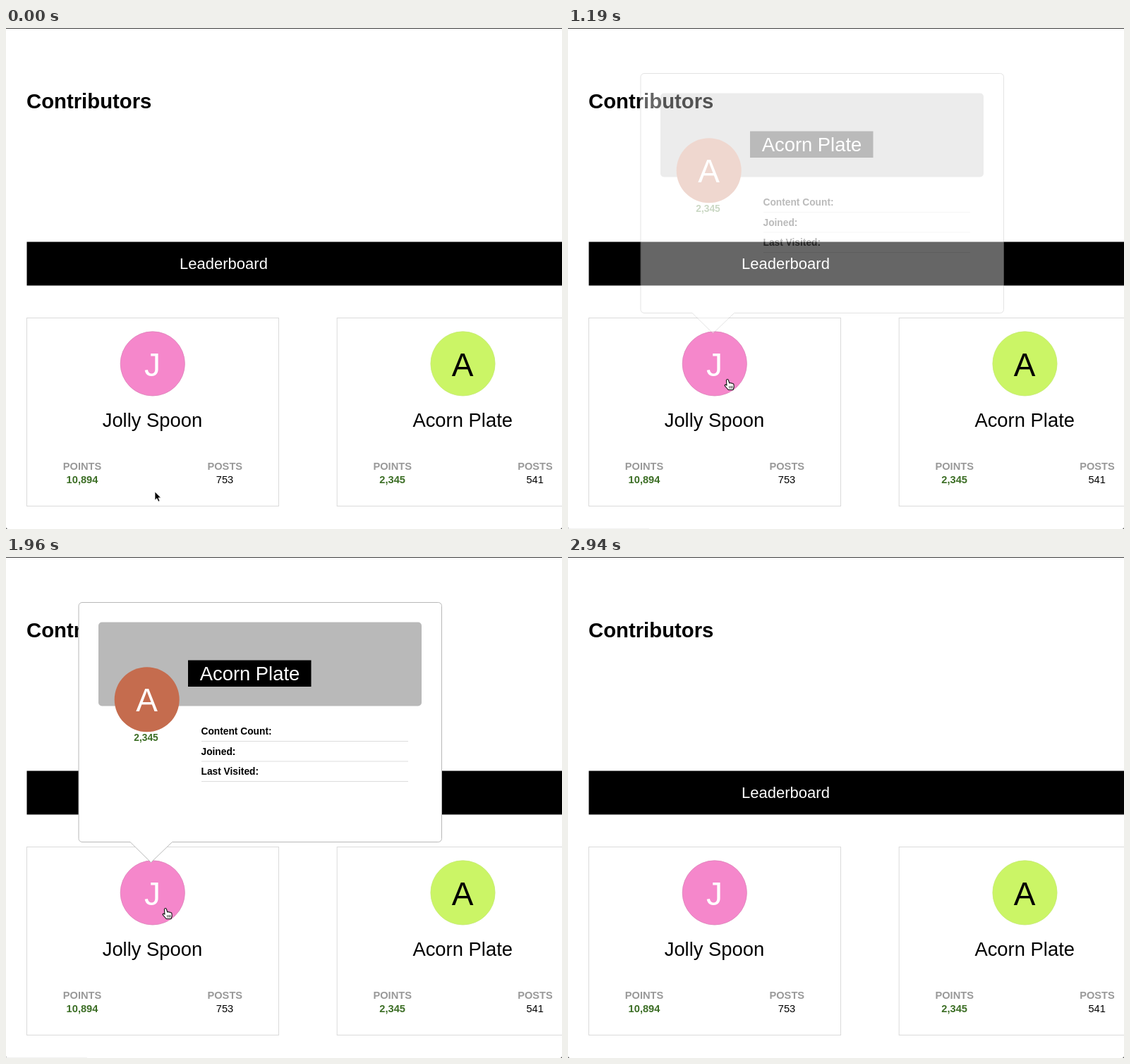
Write an HTML page that moves like this. It is 788 by 711 pixels and loops after 3010 ms.

```html
<!DOCTYPE html>
<html lang="en">
<head>
<meta charset="utf-8">
<title>Contributors</title>
<style>
html, body { margin: 0; width: 100%; height: 100%; overflow: hidden; background: #fff; }
svg { display: block; width: 788px; height: 711px; font-family: "Liberation Sans", Arial, sans-serif; }
.mid { text-anchor: middle; }
.bold { font-weight: 700; }
.name { font-size: 27.4px; }
.letter { font-size: 46px; }
.stat { font-size: 14.65px; }
.fact { font-size: 13.75px; }
.green { fill: #3c6e25; }
.grey { fill: #999; }

/* 43 ticks of 70 ms; steps(n) spans n ticks */
.cursor, .arrow, .hand, .popup, .inner, .status { animation: 3.01s step-end infinite; }
.cursor { animation-name: move; }
.arrow { animation-name: arrow; }
.hand { animation-name: hand; }
.popup { animation-name: fade; }
.inner { animation-name: settle; }
.status { animation-name: status; }

@keyframes move {
  0% { transform: translate(211px, 658px); animation-timing-function: steps(2); }
  4.651% { transform: translate(212px, 640px); animation-timing-function: steps(4); }
  13.953% { transform: translate(224px, 520px); animation-timing-function: steps(2); }
  18.605%, 69.767% { transform: translate(226px, 499px); }
  72.093% { transform: translate(228px, 510px); animation-timing-function: steps(3); }
  79.07% { transform: translate(240px, 572px); animation-timing-function: steps(4); }
  88.372%, 100% { transform: translate(250px, 725px); }
}
@keyframes arrow {
  0% { opacity: 1; }
  9.302% { opacity: 0; }
  81.395%, 100% { opacity: 1; }
}
@keyframes hand {
  0% { opacity: 0; }
  9.302% { opacity: 1; }
  81.395%, 100% { opacity: 0; }
}
@keyframes fade {
  0% { opacity: 0; }
  34.884% { opacity: 0; animation-timing-function: steps(5); }
  46.512% { opacity: 1; }
  69.767% { opacity: 1; animation-timing-function: steps(4); }
  79.07%, 100% { opacity: 0; }
}
@keyframes settle {
  0% { opacity: .45; }
  34.884% { opacity: .45; animation-timing-function: steps(5); }
  46.512% { opacity: 1; }
  69.767% { opacity: 1; animation-timing-function: steps(4); }
  79.07%, 100% { opacity: .55; }
}
@keyframes status {
  0% { opacity: 0; }
  37.209% { opacity: 1; }
  88.372%, 100% { opacity: 0; }
}
</style>
</head>
<body>
<svg viewBox="0 0 788 711">
  <rect width="788" height="711" fill="#fff"/>
  <rect width="788" height="1" fill="#3c3c3c"/>
  <path d="M0 709l2 2h-2zM788 709l-2 2h2z" fill="#555"/>
  <rect class="status" y="710" width="115" height="1" fill="#f2f2f2"/>

  <text class="bold" x="29" y="114" font-size="29.3">Contributors</text>
  <rect x="29.5" y="303.5" width="760" height="62"/>
  <text class="mid" x="308.5" y="342" font-size="22" fill="#fff">Leaderboard</text>

  <g id="cards"></g>

  <g class="popup">
    <path d="M108 64.5H612.5a5 5 0 0 1 5 5V399.5a5 5 0 0 1-5 5H235.500L205.500 433.500L176 404.500H108a5 5 0 0 1-5-5V69.500a5 5 0 0 1 5-5z" fill="#fff" stroke="#b8b8b8"/>
    <g class="inner">
      <rect x="131" y="92.500" width="458" height="119" rx="5" fill="#b9b9b9"/>
      <rect x="258" y="146.500" width="174.500" height="37.500"/>
      <text class="name mid" x="345.500" y="175" fill="#fff">Acorn Plate</text>
      <circle cx="199.700" cy="202.300" r="46" fill="#c56c4e"/>
      <text class="letter mid" x="199.700" y="219" fill="#fff">A</text>
      <text class="fact bold green mid" x="198.500" y="261">2,345</text>
      <g class="fact bold">
        <text x="276.500" y="252">Content Count:</text>
        <text x="276.500" y="280.500">Joined:</text>
        <text x="276.500" y="309">Last Visited:</text>
      </g>
      <path d="M277 261.500H570M277 290H570M277 318.500H570" stroke="#ddd"/>
    </g>
  </g>

  <g class="cursor">
    <path class="arrow" d="M0 0V12.200L2.800 9.600L4.900 14.200L7 13.300L5 8.800H8.700z" stroke="#fff" stroke-width=".8"/>
    <g class="hand" stroke="#111" stroke-linejoin="round" stroke-linecap="round">
      <path d="M-1.600 1Q-1.300-.5 0-.5Q1.100-.4 1.500 1L2.800 5Q4.200 3.900 5.200 5.200Q6.600 4.500 7.300 5.800Q8.800 5.500 9 7.300L9.200 10.500L8 14.500H1.200L-3.500 9.200Q-4.400 7.800-3.200 7.200Q-2.200 7-1 8.200z" fill="#fff" stroke-width="1.100"/>
      <path d="M2.600 9.500L3 12.300M4.700 9.300L5 12.300M6.700 9.200V12.200" fill="none" stroke-width=".8"/>
    </g>
  </g>
</svg>
<script>
const card = (dx, letter, name, points, posts, fill, ink, edge) => `
  <g transform="translate(${dx})">
    <rect x="29.5" y="411.5" width="357" height="267" fill="none" stroke="#dadada"/>
    <circle cx="207.8" cy="476.4" r="45.6" fill="${fill}" stroke="${edge}" stroke-width=".8"/>
    <text class="letter mid" x="207.5" y="493.500" fill="${ink}">${letter}</text>
    <text class="name mid" x="207.5" y="566">${name}</text>
    <g class="stat mid">
      <text class="bold grey" x="108" y="627">POINTS</text>
      <text class="bold green" x="108" y="646">${points}</text>
      <text class="bold grey" x="310.3" y="627">POSTS</text>
      <text x="310" y="646">${posts}</text>
    </g>
  </g>`;
document.getElementById('cards').innerHTML =
  card(0, 'J', 'Jolly Spoon', '10,894', '753', '#f587cb', '#fff', '#dc83b9') +
  card(439.7, 'A', 'Acorn Plate', '2,345', '541', '#cbf566', '#000', '#c6ea74');
</script>
</body>
</html>
```
